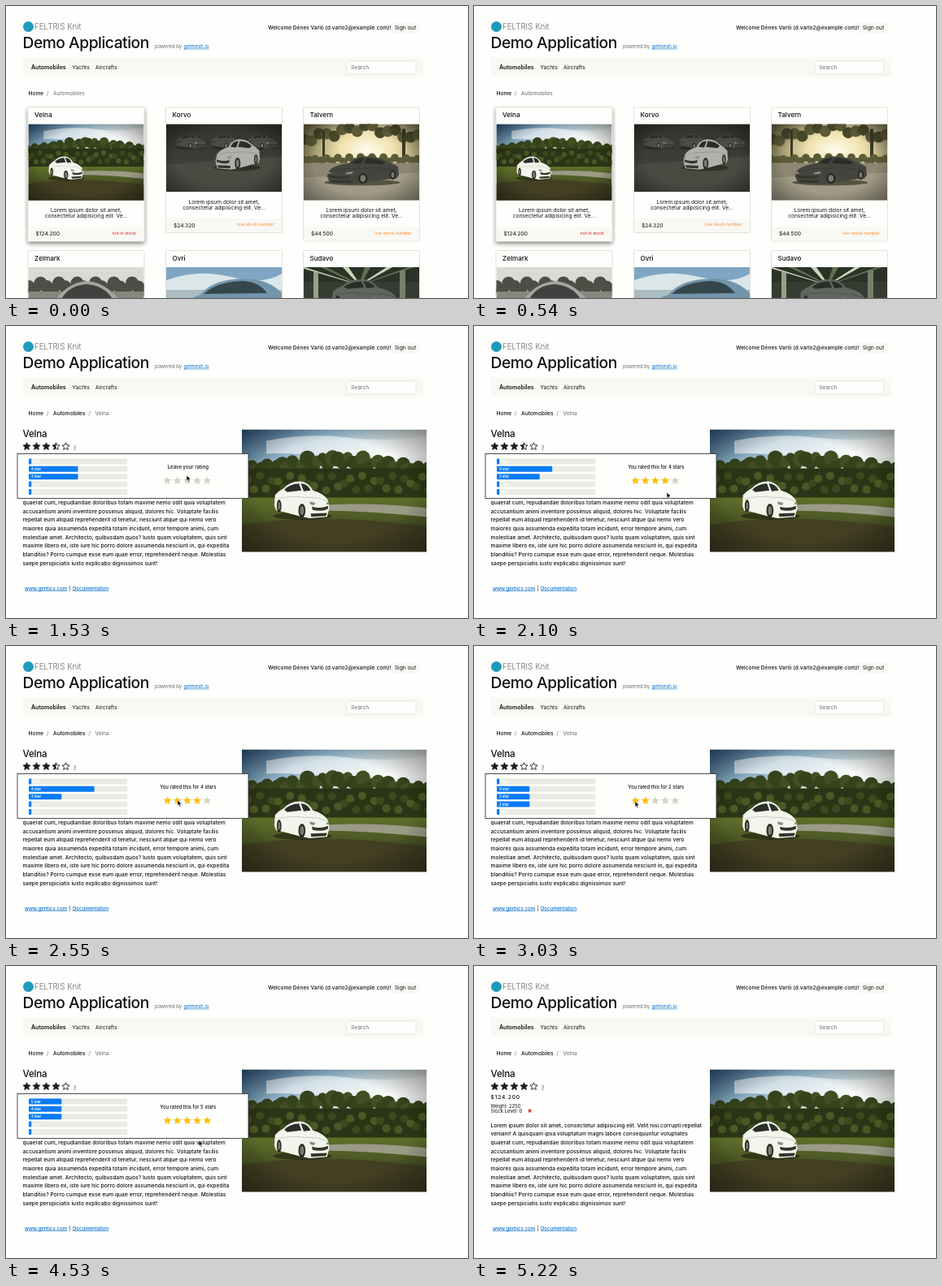
Animation, 568 px wide and 360 px high, one loop 5.25 s. Source, as an HTML page:

```html
<!DOCTYPE html>
<html lang="en">
<head>
<meta charset="utf-8">
<title>Demo Application</title>
<style>
html, body { margin: 0; width: 100%; height: 100%; overflow: hidden; background: #fefefc; }
svg { display: block; }
text { font-family: Inter, Roboto, "Open Sans", sans-serif; fill: #111; white-space: pre; }
.b { font-weight: 600; }
.m { font-weight: 500; }
.c { text-anchor: middle; }
.e { text-anchor: end; }
.g { fill: #666a66; }
.link { fill: #0a6fcf; text-decoration: underline; }
.w { fill: #fff; }
</style>
</head>
<body>
<svg id="stage" width="568" height="360" viewBox="0 0 568 360">
  <defs>
    <linearGradient id="sky" x2=".7" y2="1">
      <stop stop-color="#35618a"/><stop offset=".25" stop-color="#8fb2c6"/><stop offset=".5" stop-color="#eef3ee"/>
    </linearGradient>
    <linearGradient id="grass" x2="0" y2="1">
      <stop stop-color="#5f7029"/><stop offset=".45" stop-color="#4a5425"/><stop offset="1" stop-color="#33301d"/>
    </linearGradient>
    <radialGradient id="vignette" r=".75">
      <stop offset=".55" stop-opacity="0"/><stop offset="1" stop-opacity=".5"/>
    </radialGradient>
    <radialGradient id="sun" cx=".55" cy=".35" r=".6">
      <stop stop-color="#fffdf0"/><stop offset=".4" stop-color="#f0e2ae"/><stop offset="1" stop-color="#75704a"/>
    </radialGradient>
    <linearGradient id="hall" x2="0" y2="1">
      <stop stop-color="#34342f"/><stop offset=".5" stop-color="#3d3c37"/><stop offset="1" stop-color="#504e48"/>
    </linearGradient>
    <filter id="shadow" x="-20%" y="-20%" width="140%" height="140%">
      <feDropShadow dx="0" dy="2.5" stdDeviation="2.5" flood-color="#222" flood-opacity=".55"/>
    </filter>
    <g id="car">
      <ellipse cx="48" cy="46" rx="50" ry="5" fill="#1a1a0c" opacity=".55"/>
      <path fill="currentColor" d="M0 33L1 19Q8 13 16 10Q26 1 44 1Q58 2 66 13Q84 17 91 25L94 35L90 47L60 49L42 46L12 40L3 39Z"/>
      <path fill="#2a2e28" d="M17 12Q27 4 42 4L46 13L22 15ZM45 4Q57 4 62 13L50 14Z"/>
      <path fill="none" stroke="#0003" d="M4 24Q28 19 52 22Q74 21 90 27"/>
      <path fill="#33352c" d="M64 34Q78 37 92 33L91 37Q78 41 65 38ZM62 43L90 42L88 46L63 47Z"/>
      <path fill="#8b9088" d="M60 27L70 29L68 32L61 31ZM91 27L93 31L88 31Z"/>
      <ellipse cx="8" cy="33" rx="4" ry="8" fill="#25261d"/><ellipse cx="8" cy="33" rx="2" ry="5" fill="#777a70"/>
      <ellipse cx="47" cy="39" rx="6" ry="9" fill="#25261d"/><ellipse cx="47" cy="39" rx="3.5" ry="6" fill="#777a70"/>
    </g>
  </defs>
  <g id="list"></g>
  <g id="detail"></g>
  <g id="live"></g>
  <g id="head"></g>
  <path id="cursor" d="M0 0V8.2L2 6.5L3.4 9.6L4.8 9L3.4 6H6Z" fill="#111" stroke="#fff" stroke-width=".6"/>
</svg>
<script>
const $ = id => document.getElementById(id);
const LOOP = 5250, LEAVE_LIST = 630, OPEN = 1250, CLOSE = 5040;
const BRAND = 'Velna', PAGE = '#fefefc', PANEL = '#f8f8f4';

const text = (x, y, s, size = 6.7, cls = '', more = '') =>
  `<text x="${x}" y="${y}" font-size="${size}" class="${cls}" ${more}>${s}</text>`;
const rect = (x, y, w, h, fill, more = '') =>
  `<rect x="${x}" y="${y}" width="${w}" height="${h}" fill="${fill}" ${more}/>`;
const range = (n, f) => Array.from({ length: n }, (_, i) => f(i)).join('');
const blob = (x, y, r, fill) => `<circle cx="${x}" cy="${y}" r="${r}" fill="${fill}"/>`;
const shape = (d, fill) => `<path d="${d}" fill="${fill}"/>`;
const car = (color, transform) => `<use href="#car" color="${color}" transform="${transform}"/>`;
const picture = (x, y, w, h, vw, vh, body) =>
  `<svg x="${x}" y="${y}" width="${w}" height="${h}" viewBox="0 0 ${vw} ${vh}">${body}</svg>`;

// Photo stand-ins
const meadow = rect(0, 0, 227, 151, 'url(#sky)') +
  shape('M30 14Q80 4 130 10T227 8V34Q160 40 110 34T30 30Z', '#fff9') +
  range(38, i => blob(i * 6.2, 44 + 6 * Math.cos(i / 6) + 5 * Math.sin(i * 2.3), 8 + 2 * Math.sin(i * 5), i % 3 ? '#36421c' : '#434f22')) +
  rect(0, 48, 227, 40, '#2b3416') +
  range(32, i => blob(i * 7.4, 66 + 9 * Math.sin(i * 3.7), 5, i % 2 ? '#3c481d' : '#4a5824')) +
  rect(0, 84, 227, 67, 'url(#grass)') +
  shape('M100 93Q165 90 227 97V108Q165 101 100 100Z', '#9b9b88') +
  shape('M0 118Q70 106 150 112T227 122V151H0Z', '#433f23') +
  car('#f3f4ec', 'translate(40 63) scale(.72 .95)') + rect(0, 0, 227, 151, 'url(#vignette)');

const showroom = rect(0, 0, 142, 84, 'url(#hall)') +
  range(3, i => car('#4c4c46', `translate(${12 + i * 44} 12) scale(.38)`)) +
  shape('M0 50L142 40V84H0Z', '#4a4942') +
  car('#b0b1ac', 'translate(115 18) scale(-.58 .78)') + rect(0, 0, 142, 84, 'url(#vignette)');

const sunset = rect(0, 0, 142, 94, 'url(#sun)') +
  range(16, i => blob(i * 9.4, 3 + 16 * Math.abs(i / 8 - 1) + 4 * Math.sin(i * 2), 7, i % 2 ? '#5d5c38' : '#48492a')) +
  rect(23, 8, 3, 46, '#3e3a26') + rect(121, 6, 4, 50, '#3e3a26') +
  range(21, i => blob(i * 7, 44 + 3 * Math.sin(i * 3), 5, '#5c5b38')) +
  rect(0, 48, 142, 46, '#8d8773') + shape('M0 66L142 60V94H0Z', '#a09a86') +
  car('#45453f', 'translate(117 39) scale(-.94 .72)') + rect(0, 0, 142, 94, 'url(#vignette)');

const coast = rect(0, 0, 142, 94, '#d9dad4') +
  range(20, i => blob(i * 7.5, 24 + 5 * Math.sin(i * 2.1), 8, '#4b4f46')) + rect(0, 30, 142, 64, '#85877d') +
  shape('M18 70Q36 20 72 17Q108 20 128 70Z', '#a3a59e') +
  shape('M40 40Q50 22 72 21Q94 23 104 40Z', '#3f423e');

const lake = rect(0, 0, 142, 94, '#7fa6c4') + shape('M0 16Q40 2 80 12T142 8V30H0Z', '#dbe6e8') +
  rect(0, 28, 142, 66, '#a8bcc2') +
  shape('M18 70Q18 40 42 34Q58 14 98 14Q126 15 142 32V94H18Z', '#7295ac') +
  shape('M46 33Q62 18 94 17Q114 18 124 32Z', '#36474c') +
  shape('M24 45L46 40L42 46L25 50Z', '#e9f0ea');

const garage = rect(0, 0, 142, 94, '#2c3228') +
  range(6, i => shape(`M${i * 27 - 6} 0h7L70 22h-2Z`, i % 2 ? '#5c7052' : '#c9d6b8')) +
  rect(0, 18, 142, 76, '#363c32') + rect(12, 6, 6, 40, '#98a087') + rect(118, 4, 7, 40, '#76806a') +
  car('#5f665c', 'translate(35 14) scale(.85)');

const star = (x, y, r, attrs) => {
  const points = Array.from({ length: 10 }, (_, i) => {
    const a = i * Math.PI / 5, d = i % 2 ? r * .46 : r;
    return (x + d * Math.sin(a)).toFixed(2) + ',' + (y - d * Math.cos(a)).toFixed(2);
  });
  return `<polygon points="${points.join(' ')}" stroke-linejoin="round" ${attrs}/>`;
};

// Listing page
function card(x, y, name, art, artH, price, stock, color, hover) {
  const d = y + 20.5 + artH, mid = x + 71.5;
  return rect(x, y, 143, artH + 71, PAGE, `stroke="#dcdcd0" stroke-width=".8" rx="1" ${hover ? 'filter="url(#shadow)"' : ''}`) +
    rect(x + .5, d + 33, 142, 17, PANEL) +
    text(x + 8, y + 12.2, name, 8.1, 'm') +
    picture(x + .5, y + 20.5, 142, artH, 142, artH, art) +
    text(mid, d + 14.5, 'Lorem ipsum dolor sit amet,', 6.65, 'c') +
    text(mid, d + 21.8, 'consectetur adipisicing elit. Ve...', 6.65, 'c') +
    text(x + 9.5, d + 43.6, price, 6.7) +
    text(x + 133, d + 42, stock, 5.4, 'e', `style="fill:${color}"`);
}
const small = `<g transform="scale(.6256)">${meadow}</g>`;
const low = 'low stock number', orange = '#f58a2c';
$('list').innerHTML =
  card(27, 125, BRAND, small, 94, '$124.200', 'not in stock', '#e0201b', true) +
  card(196.5, 125, 'Korvo', showroom, 83.5, '$24.320', low, orange) +
  card(365.5, 125, 'Talvern', sunset, 94, '$44.500', low, orange) +
  card(27, 301.5, 'Zelmark', coast, 94, '', '', orange) +
  card(196.5, 301.5, 'Ovri', lake, 94, '', '', orange) +
  card(365.5, 301.5, 'Sudavo', garage, 94, '', '', orange) +
  text(58, 110, 'Automobiles', 6.6, 'g');

// Detail page
const story = `Lorem ipsum dolor sit amet, consectetur adipisicing elit. Velit nisi corrupti repellat
veniam! A quisquam ipsa voluptatum magni labore consequuntur voluptates
quaerat cum, repudiandae doloribus totam maxime nemo odit quia voluptatem
accusantium animi inventore possimus aliquid, dolores hic. Voluptate facilis
repellat eum aliquid reprehenderit id tenetur, nesciunt atque qui nemo vero
maiores quia assumenda expedita totam incidunt, error tempore animi, cum
molestiae amet. Architecto, quibusdam quos? Iusto quam voluptatem, quis sint
maxime libero ex, iste iure hic porro dolore assumenda nesciunt in, qui expedita
blanditiis? Porro cumque esse eum quae error, reprehenderit neque. Molestias
saepe perspiciatis iusto explicabo dignissimos sunt!`;
$('detail').innerHTML =
  text(58, 110, 'Automobiles', 6.6, 'm') + text(101.5, 110, '/', 6.6, 'g') + text(109.5, 110, BRAND, 6.6, 'g') +
  text(20.5, 137.3, BRAND, 11.6, 'm', 'letter-spacing="-.2"') +
  text(20.5, 164, '$124.200', 6.7, 'm', 'letter-spacing=".8"') +
  text(20.5, 174.5, 'Weight: 2250', 5.8) + text(20.5, 181, 'Stock Level: 0', 5.8) +
  '<path d="M66.8 176.8l3.6 3.6m0 -3.6l-3.6 3.6" stroke="#d5202b" stroke-width="1.3"/>' +
  story.split('\n').map((line, i) => text(20.5, 198.7 + i * 10.68, line, 6.7, 'm')).join('') +
  picture(290, 127.5, 227, 151, 227, 151, meadow) +
  text(23, 325.5, 'www.gentics.com', 6.05, 'm link') + text(77.6, 325.5, '|', 6.1) +
  text(82, 325.5, 'Documentation', 6.05, 'm link');

// Shared header
$('head').innerHTML =
  blob(27.5, 25.5, 6.5, '#1d9cba') +
  text(35, 29.2, 'FELTRIS Knit', 9.8, 'g', 'font-weight="300"') +
  text(20.5, 51.7, 'Demo Application', 19.2, 'm', 'letter-spacing="-.45"') +
  text(183, 51.7, 'powered by', 5.95, 'g') + text(218.5, 51.7, 'getmesh.io', 5.95, 'link') +
  text(322, 28.5, 'Welcome Dénes Varló (d.varlo2@example.com)!', 6.55, 'm') +
  rect(473, 20, 36, 14, PANEL, 'rx="1.5"') + text(477.7, 29.3, 'Sign out', 6.8) +
  rect(21, 63.5, 492, 24, PANEL) +
  text(31, 78.2, 'Automobiles', 7, 'b') + text(81.5, 78.2, 'Yachts', 6.7) + text(110, 78.2, 'Aircrafts', 6.7) +
  rect(419, 68, 85, 16, PAGE, 'stroke="#dddeda" stroke-width=".7" rx="1.5"') +
  text(424, 78.2, 'Search', 6.7, 'g') +
  text(27.5, 110, 'Home', 6.6, 'm') + text(50, 110, '/', 6.6, 'g');

// Ratings: [time, stars given]
const ratings = [[0, 0], [1935, 4], [2580, 2], [3170, 1], [3800, 5]];
const FADE = 90, DELAY = 90, GROW = 180;
const clamp = v => Math.min(1, Math.max(0, v));
const ease = p => p * p * (3 - 2 * p);
const votes = mine => mine ? [4, 3, mine] : [4, 3];
const share = (mine, n) => votes(mine).filter(v => v === n).length / votes(mine).length;

function headStars(mine) {
  const all = votes(mine);
  const mean = Math.round(all.reduce((a, b) => a + b) / all.length * 2) / 2;
  return range(5, i => {
    const x = 25.5 + i * 12, left = mean - i;
    const line = 'stroke="#1c1c1c" stroke-width=".9"';
    const fill = left >= 1 ? '#1c1c1c' : 'none';
    const half = left === .5 ? `<svg width="${x}" height="360">${star(x, 148.6, 4.8, 'fill="#1c1c1c"')}</svg>` : '';
    return star(x, 148.6, 4.8, `fill="${fill}" ${line}`) + half;
  }) + text(83, 151, all.length, 5, 'm link');
}

function popover(mine, before, since) {
  const p = ease(clamp((since - DELAY) / GROW));
  const bars = range(5, i => {
    const n = 5 - i, y = 163.5 + i * 9.35;
    const part = share(before, n) + (share(mine, n) - share(before, n)) * p;
    return rect(28, y, 121, 7, '#e9ebe4', 'rx="1"') +
      rect(28, y, Math.max(3.3, 121 * part), 7, '#087cf5', 'rx="1"') +
      text(31, y + 5, n + ' star', 4.4, 'w b');
  });
  const label = mine ? `You rated this for ${mine} stars` : 'Leave your rating';
  const alpha = mine ? clamp(since / FADE) : 1;
  return rect(14, 157.5, 284, 55, PAGE, 'stroke="#3c3c38" stroke-width=".9"') + bars +
    `<g opacity="${alpha}">` + text(223.8, 176.4, label, mine ? 5.9 : 6.05, 'c m') +
    range(5, i => star(198.5 + i * 12.2, 190.7, 5.3, `fill="${i < mine ? '#fcbf12' : '#d5d3c6'}"`)) + '</g>';
}

// Pointer tip: time, x, y
const path = [
  [630, 89, 198], [780, 89, 198], [1130, 84, 148], [1250, 84, 148], [1530, 222, 184],
  [1700, 236, 189], [1850, 236, 189], [2050, 237, 205], [2200, 237, 205], [2400, 211, 190],
  [2540, 211, 190], [2900, 198, 191.5], [3140, 198, 191.5], [3520, 247, 189], [3720, 247, 189],
  [3840, 237, 215], [5250, 237, 215]
];
function pointerAt(t) {
  const i = Math.max(1, path.findIndex(k => k[0] > t));
  const [a, b] = [path[i - 1], path[i]], p = ease(clamp((t - a[0]) / (b[0] - a[0])));
  return [1, 2].map(k => a[k] + (b[k] - a[k]) * p);
}

const show = (el, on) => el.setAttribute('visibility', on ? 'visible' : 'hidden');
function draw() {
  const t = performance.now() % LOOP, inDetail = t >= LEAVE_LIST;
  show($('list'), !inDetail);
  show($('detail'), inDetail);
  show($('cursor'), inDetail && t < CLOSE);
  $('cursor').setAttribute('transform', `translate(${pointerAt(t)}) scale(.85)`);

  const i = ratings.filter(r => r[0] <= t).length - 1;
  const [start, mine] = ratings[i], before = i ? ratings[i - 1][1] : 0, since = t - start;
  let live = '';
  if (inDetail) live = headStars(since >= DELAY ? mine : before);
  if (t >= OPEN && t < CLOSE) live += popover(mine, before, since);
  $('live').innerHTML = live;
  requestAnimationFrame(draw);
}
draw();
</script>
</body>
</html>
```
